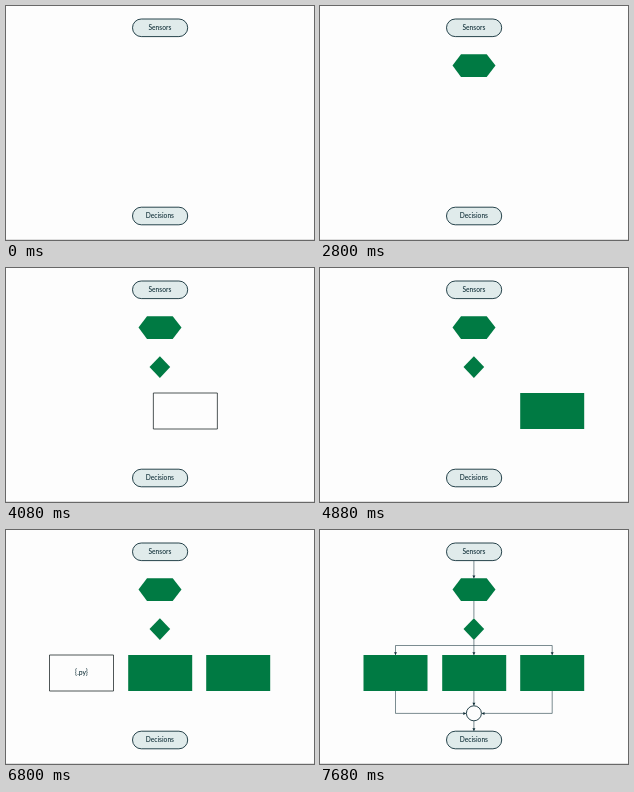
Animation, 308 px wide and 234 px high, one loop 8 s. Source, as an HTML page with a canvas:

```html
<!DOCTYPE html>
<html lang="en">
<head>
<meta charset="utf-8">
<title>Sensors to Decisions</title>
<style>
html, body { margin: 0; width: 100%; height: 100%; overflow: hidden; background: #fdfdfd; }
canvas { display: block; width: 308px; height: 234px; }
</style>
</head>
<body>
<canvas id="stage"></canvas>
<script>
const W = 308, H = 234, LOOP = 8000, STEP = 80, SLIDE = 400;
const INK = '#102f38', GREEN = '#007a43', MIST = '#e0ebeb', PAPER = '#fdfdfd';
const MID = 153.9;
const canvas = document.getElementById('stage');
const ctx = canvas.getContext('2d');
const dpr = window.devicePixelRatio || 1;
canvas.width = W * dpr;
canvas.height = H * dpr;

const clamp = v => Math.max(0, Math.min(1, v));
const box = x => [[x, 125], [x + 64, 125], [x + 64, 161], [x, 161]];

// start: slide begins off the left edge; done: the outline turns solid
const nodes = [
  { pts: [[132.5, 59.5], [141, 48.3], [166.7, 48.3], [175.5, 59.5], [166.7, 71], [141, 71]],
    start: 2240, done: 2800, label: '{.rs}', at: [153.4, 58.5] },
  { pts: [[MID, 88.3], [164.2, 99], [MID, 110], [143.5, 99]], start: 2960, done: 3600 },
  { pts: box(200.2), start: 3760, done: 4880 },
  { pts: box(122.2), start: 4960, done: 5920 },
  { pts: box(43.5), start: 6080, done: 6880, label: '{.py}', at: [75.5, 143] }
];

function text(str, x, y, size) {
  ctx.font = `500 ${size}px Lato, sans-serif`;
  ctx.fillStyle = INK;
  ctx.textAlign = 'center';
  ctx.textBaseline = 'alphabetic';
  ctx.fillText(str, x, y + size * 0.33);
}

function trace(pts, closed) {
  ctx.beginPath();
  pts.forEach(([x, y], i) => i ? ctx.lineTo(x, y) : ctx.moveTo(x, y));
  if (closed) ctx.closePath();
}

function pill(label, y) {
  ctx.beginPath();
  ctx.roundRect(126.5, y, 55.2, 17.6, 8.8);
  ctx.fillStyle = MIST;
  ctx.fill();
  ctx.strokeStyle = INK;
  ctx.lineWidth = 0.9;
  ctx.stroke();
  text(label, MID, y + 8.8, 6.65);
}

function drawNode(n, t) {
  if (t <= n.start) return;
  const right = Math.max(...n.pts.map(p => p[0]));
  const dx = -right * (1 - clamp((t - n.start) / SLIDE));
  const solid = t >= n.done;
  ctx.save();
  ctx.translate(dx, 0);
  trace(n.pts, true);
  ctx.fillStyle = solid ? GREEN : PAPER;
  ctx.fill();
  if (!solid) {
    ctx.strokeStyle = '#222b2d';
    ctx.lineWidth = 0.8;
    ctx.stroke();
    if (n.label) text(n.label, ...n.at, 6.8);
  }
  ctx.restore();
}

// Connector whose last segment may end in an arrowhead
function wire(pts, head = true) {
  trace(pts);
  ctx.stroke();
  if (!head) return;
  const [a, b] = pts.slice(-2);
  ctx.save();
  ctx.translate(...b);
  ctx.rotate(Math.atan2(b[1] - a[1], b[0] - a[0]));
  trace([[0, 0], [-2.8, -1.5], [-2.8, 1.5]], true);
  ctx.fill();
  ctx.restore();
}

function wires(alpha) {
  if (alpha <= 0) return;
  ctx.save();
  ctx.globalAlpha = alpha;
  ctx.strokeStyle = ctx.fillStyle = INK;
  ctx.lineWidth = 0.55;
  wire([[MID, 31], [MID, 48.3]]);
  wire([[MID, 71], [MID, 88.3]], false);
  wire([[MID, 110], [MID, 125]]);
  for (const x of [75.5, 232.2]) {
    wire([[MID, 115.5], [x, 115.5], [x, 125]]);
    wire([[x, 161], [x, 183.4], [MID + Math.sign(x - MID) * 7.8, 183.4]]);
  }
  wire([[MID, 161], [MID, 175.6]]);
  wire([[MID, 191], [MID, 201]]);
  ctx.beginPath();
  ctx.arc(MID, 183.3, 7.5, 0, Math.PI * 2);
  ctx.fillStyle = PAPER;
  ctx.fill();
  ctx.lineWidth = 0.9;
  ctx.stroke();
  ctx.restore();
}

function draw(now) {
  const t = Math.floor((now % LOOP) / STEP) * STEP;
  ctx.setTransform(dpr, 0, 0, dpr, 0, 0);
  ctx.fillStyle = PAPER;
  ctx.fillRect(0, 0, W, H);
  ctx.fillStyle = '#dedede';
  ctx.fillRect(0, 233, W, 1);
  pill('Sensors', 13);
  pill('Decisions', 201.2);
  nodes.forEach(n => drawNode(n, t));
  wires(clamp((t - 7360) / 320));
}

const origin = performance.now();
function tick() {
  draw(performance.now() - origin);
  requestAnimationFrame(tick);
}
tick();
</script>
</body>
</html>
```
